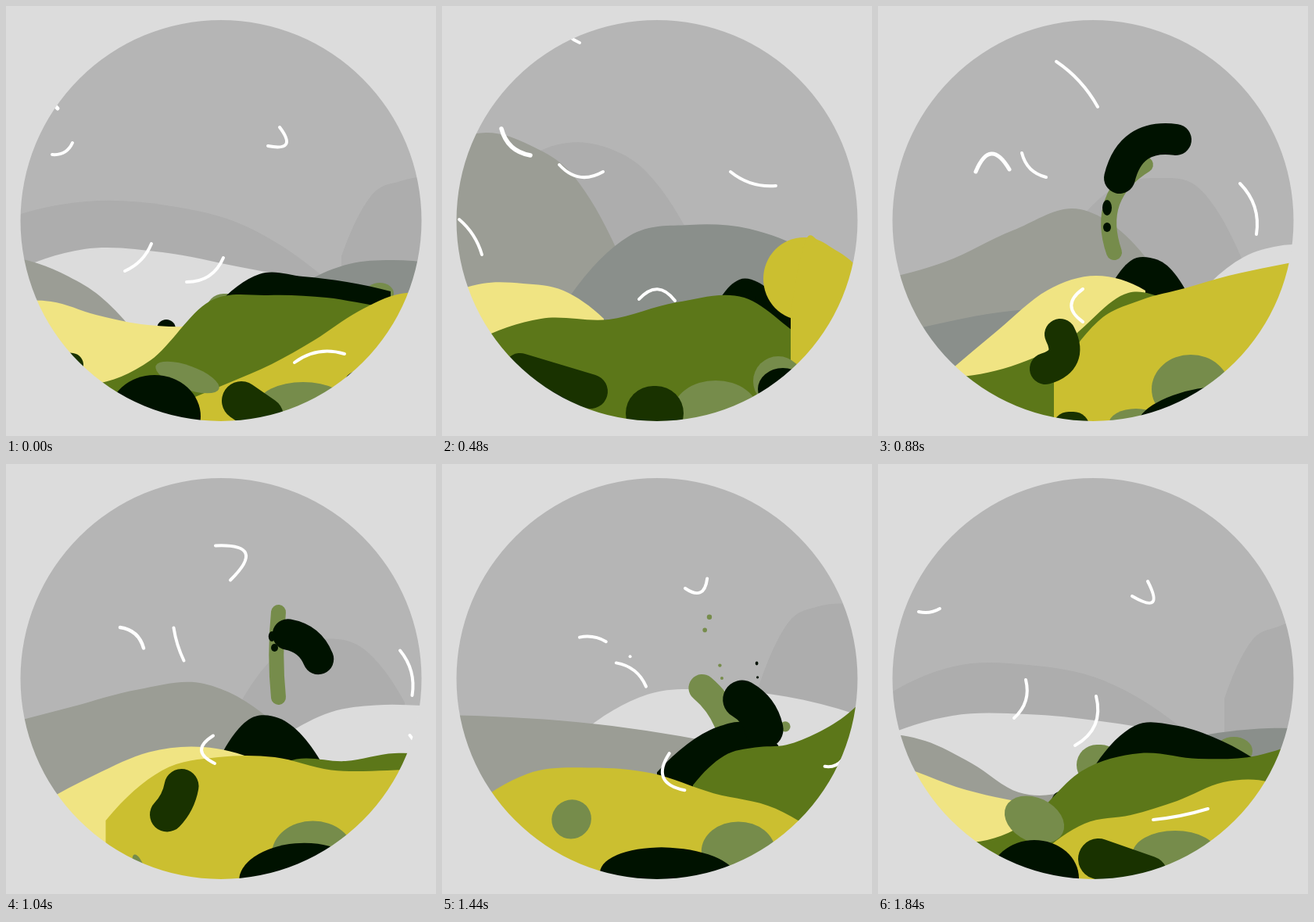
Recreate the animation shown at these times as an HTML page with a canvas. Size 550 by 550 pixels, loop 1920 ms.

```html
<!DOCTYPE html>
<html lang="en">
<head>
<meta charset="utf-8">
<title>Rolling hills</title>
<style>
html, body { margin: 0; width: 100%; height: 100%; overflow: hidden; background: #dcdcdc }
canvas { display: block }
</style>
</head>
<body>
<canvas id="stage" width="550" height="550"></canvas>
<script>
const ctx = document.getElementById('stage').getContext('2d');
const STEP = 80, STEPS = 24;
const TIMES = [0, 2, 6, 11, 15, 20, 23, 24]; // steps at which poses are reached
const POSES = TIMES.length - 1;
const sky = '#b5b5b5', haze = '#adadad', mist = '#dcdcdc', warm = '#9b9d95', slate = '#8a8f8b',
  pale = '#f0e483', black = '#001200', green = '#5c7719', gold = '#cbbf30', moss = '#768c4b',
  dark = '#193200', white = '#fff';

// A part with exactly POSES poses is cyclic; a longer chain lives on into the next loops.
const parts = [];
const add = draw => (color, ...poses) => parts.push({ draw, color, poses });
const hill = add(drawHill), oval = add(drawOval), arc = add(drawArc);
const skip = n => Array(n).fill(null);
const flat = (left, right, y) => [left, right, ...Array(5).fill(y)];

// Skyline through heights spaced evenly from left to right
function drawHill([left, right, ...h], color) {
  const last = h.length - 1, dx = (right - left) / last;
  const slope = i =>
    i === 0 ? (4 * h[1] - 3 * h[0] - h[2]) / 2 :
    i === last ? (3 * h[i] - 4 * h[i - 1] + h[i - 2]) / 2 :
    (h[i + 1] - h[i - 1]) / 2;
  ctx.beginPath();
  ctx.moveTo(left, 600);
  ctx.lineTo(left, h[0]);
  for (let i = 0, x = left; i < last; i++, x += dx) {
    ctx.bezierCurveTo(x + dx / 3, h[i] + slope(i) / 3,
      x + dx * 2 / 3, h[i + 1] - slope(i + 1) / 3, x + dx, h[i + 1]);
  }
  ctx.lineTo(right, 600);
  ctx.fillStyle = color;
  ctx.fill();
}
function drawOval([x, y, rx, ry, tilt = 0], color) {
  ctx.beginPath();
  ctx.ellipse(x, y, rx, ry, tilt * Math.PI / 180, 0, 2 * Math.PI);
  ctx.fillStyle = color;
  ctx.fill();
}
// Round-ended curve, bent sideways by a share of its length
function drawArc([x1, y1, x2, y2, bend, width = 4], color) {
  ctx.beginPath();
  ctx.moveTo(x1, y1);
  ctx.quadraticCurveTo((x1 + x2) / 2 - bend * (y2 - y1), (y1 + y2) / 2 + bend * (x2 - x1), x2, y2);
  ctx.strokeStyle = color;
  ctx.lineWidth = width;
  ctx.stroke();
}

// Distance
hill(haze, ...skip(4),
  flat(0, 300, 400),
  [0, 300, 345, 311, 303, 310, 340],
  [0, 385, 303, 259, 257, 277, 335],
  [0, 410, 272, 250, 255, 282, 350],
  [0, 400, 245, 231, 246, 281, 340],
  [100, 315, 200, 176, 180, 212, 290],
  [245, 470, 290, 233, 220, 236, 335],
  [355, 550, 320, 244, 227, 237, 275],
  [437, 560, 265, 177, 153, 140, 130],
  [443, 580, 300, 227, 208, 198, 190],
  [429, 580, 320, 243, 224, 217, 215],
  [380, 570, 310, 285, 283, 292, 300],
  flat(430, 570, 340));
hill(mist,
  [0, 400, 345, 311, 315, 334, 353],
  [80, 300, 345, 337, 337, 347, 372],
  flat(380, 600, 430),
  [424, 600, 355, 321, 307, 305, 308],
  [290, 580, 340, 314, 310, 313, 320],
  [97, 495, 352, 282, 275, 287, 320],
  [0, 380, 352, 322, 320, 329, 345]);
hill(warm,
  [0, 160, 320, 329, 346, 371, 412],
  [0, 178, 248, 256, 278, 320, 400],
  [0, 225, 180, 162, 178, 218, 315],
  [0, 345, 350, 327, 287, 260, 325],
  [0, 330, 315, 294, 290, 302, 328],
  [0, 360, 325, 344, 357, 367, 375],
  [0, 240, 345, 354, 383, 420, 418]);
hill(slate,
  [385, 600, 352, 330, 325, 329, 340],
  [305, 560, 357, 306, 301, 309, 330],
  [163, 470, 372, 294, 280, 285, 315],
  [0, 280, 425, 408, 394, 386, 380],
  flat(100, 380, 450),
  flat(300, 500, 430),
  [400, 600, 350, 342, 338, 339, 345]);

// Bushes and what they throw up
arc(moss,
  [278, 390, 285, 390, 0, 44], null,
  [385, 380, 390, 380, 0, 20],
  [342, 203, 302, 315, .4, 20],
  [355, 176, 395, 282, -.3, 18],
  [318, 360, 345, 362, 0, 46],
  [280, 385, 285, 385, 0, 52]);
oval(moss, [478, 368, 18, 14], [480, 370, 0, 0], ...skip(2),
  [430, 340, 0, 0], [445, 333, 11, 11], [455, 367, 24, 18]);
hill(black,
  [268, 492, 385, 343, 346, 353, 365],
  [247, 500, 380, 347, 347, 350, 343],
  [357, 450, 372, 350, 353, 371, 400],
  [298, 398, 358, 326, 322, 335, 372],
  [257, 408, 378, 330, 323, 345, 390],
  [287, 445, 405, 377, 345, 322, 340],
  [278, 478, 385, 335, 334, 349, 375]);
arc(black, ...skip(2),
  [385, 372, 392, 374, 0, 20],
  [309, 220, 381, 171, -.45, 40],
  [412, 216, 418, 328, -.1, 39],
  [365, 358, 408, 347, -.3, 56],
  null);
oval(black, [205, 413, 12, 12], [197, 390, 12, 12], [250, 420, 4, 4], [293, 258, 6, 10],
  [387, 183, 2.5, 3], [413, 303, 1.5, 2], [233, 433, 11, 14]);
oval(black, ...skip(2), [360, 380, 0, 0], [293, 283, 5, 6], [394, 187, 4, 4], [410, 330, 0, 0], null);
for (const [x1, y1, x2, y2, r, color = moss] of [
  [302, 210, 359, 214, 4], [290, 239, 399, 270, 2.5], [298, 217, 398, 312, 2],
  [330, 182, 350, 205, 5], [240, 275, 241, 227, 2, white]
]) oval(color, ...skip(4), [x1, y1, r, r], [x2, y2, 2, 2], null);

// Fields
hill(pale,
  [0, 230, 380, 378, 395, 407, 410],
  [0, 180, 390, 369, 357, 368, 402],
  [0, 207, 372, 355, 355, 364, 400],
  [90, 342, 468, 415, 364, 345, 364],
  [0, 300, 400, 380, 373, 379, 394],
  flat(0, 290, 450),
  [0, 200, 378, 394, 413, 426, 435]);
oval(green, ...skip(4), [55, 440, 0, 0], [78, 423, 32, 12], [100, 480, 0, 0]);
hill(green,
  [110, 560, 484, 453, 378, 370, 373, 385, 390],
  [60, 560, 470, 443, 379, 378, 391, 408, 415],
  [40, 560, 430, 400, 401, 379, 373, 430, 440],
  [80, 560, 475, 464, 429, 367, 385, 385, 385],
  [285, 560, 397, 375, 377, 388, 375, 355, 365],
  [345, 560, 420, 372, 353, 340, 323, 294, 220],
  [110, 560, 484, 462, 393, 370, 377, 373, 345]);
oval(gold, null, [512, 385, 40, 45], [463, 349, 52, 53], [440, 420, 45, 50], ...skip(3));
hill(gold,
  [230, 560, 505, 482, 458, 427, 391, 368, 372],
  [370, 560, 495, 469, 436, 373, 332, 331, 345],
  [446, 560, 395, 300, 302, 312, 325, 345, 360],
  [225, 560, 480, 404, 376, 361, 345, 333, 322],
  [30, 560, 432, 380, 374, 389, 438, 451, 452],
  [30, 470, 455, 407, 398, 400, 410, 434, 520],
  [205, 560, 502, 460, 449, 431, 407, 407, 440]);

// Foreground
oval(moss,
  [232, 475, 43, 15, 20], [258, 510, 60, 17, 0], null, [165, 540, 7, 20, 0],
  [177, 500, 7, 23, -37], [158, 424, 38, 26, -30], [200, 455, 40, 28, 25]);
oval(moss, null,
  [433, 478, 15, 15], [430, 480, 32, 32], [400, 490, 50, 44], [385, 508, 55, 41],
  [375, 487, 42, 36, -25], [380, 500, 55, 31], [380, 510, 58, 29],
  [350, 510, 60, 38], [350, 520, 55, 41], [330, 535, 35, 20]);
arc(dark,
  [76, 458, 84, 459, 0, 30],
  [85, 465, 108, 457, 0, 44],
  [100, 466, 190, 493, 0, 44],
  [233, 420, 214, 464, -.6, 40],
  [216, 404, 198, 433, .3, 48],
  ...skip(2));
arc(dark,
  [301, 505, 330, 525, 0, 50],
  [305, 535, 322, 511, 0, 44],
  [270, 521, 274, 521, 0, 70],
  [244, 540, 250, 540, 0, 42],
  [240, 560, 250, 560, 0, 30],
  [228, 512, 316, 505, 0, 52],
  [282, 505, 345, 527, 0, 52]);
oval(black,
  [450, 485, 18, 18], [444, 482, 20, 20], [436, 490, 32, 27], [415, 525, 85, 36, -10],
  [332, 530, 66, 49, 0], [262, 525, 103, 28, 5], [200, 530, 57, 49, 0],
  [190, 525, 59, 53, 0], [160, 520, 75, 57, 0], [120, 525, 90, 38, 25], [120, 590, 60, 30, 0]);

// Wind
arc(white,
  [55, 120, 66, 131, 0, 5], [62, 122, 78, 144, -.2, 5], [76, 157, 113, 191, .32, 5.5],
  [125, 212, 168, 209, -1, 5], [167, 206, 184, 262, .35, 4], [182, 232, 227, 204, -.55, 4],
  [174, 325, 189, 276, .3, 4], [152, 339, 186, 304, .2, 4], [84, 342, 158, 334, .2, 4],
  [22, 273, 51, 318, -.15, 4], [-40, 300, -10, 345, 0, 4]);
arc(white, ...skip(4),
  [-10, 150, 0, 165, 0], [30, 165, 41, 181, 0], [52, 189, 79, 185, .2],
  [59, 190, 85, 175, .35], [83, 175, 130, 172, -.3], [150, 203, 206, 212, .4],
  [184, 188, 215, 219, .3], [245, 231, 240, 284, -.15], [208, 270, 275, 285, -.35],
  [252, 360, 279, 297, .38], [231, 353, 278, 322, .33], [256, 345, 241, 370, 1.4],
  [252, 375, 298, 377, -.6], [262, 362, 262, 404, .7], [268, 333, 272, 362, 1.1],
  [306, 395, 336, 454, .5], [352, 455, 422, 441, .05], [369, 456, 433, 445, -.25],
  [420, 447, 440, 468, -.3], [510, 450, 530, 470, -.3]);
arc(white, null,
  [130, 5, 153, 28, 0], [150, 25, 176, 47, .15], [228, 71, 281, 129, -.12],
  [308, 138, 293, 168, -2.5], [360, 152, 323, 153, .3], [345, 150, 325, 169, -1.7],
  [350, 155, 335, 179, -1.3], [354, 164, 352, 199, -.3], [369, 212, 427, 230, .2],
  [463, 227, 484, 292, -.25], [545, 250, 555, 300, -.2]);
arc(white, ...skip(3),
  [550, 330, 575, 340, .3], [483, 364, 515, 372, .55], [494, 402, 510, 383, .1], [545, 400, 560, 385, 0]);

function blend(from, to, u) {
  if (!u) return from;
  return from && to && from.map((v, i) => v + ((to[i] ?? 0) - v) * u);
}

function frame(now) {
  const step = Math.floor(now / STEP) % STEPS;
  const span = TIMES.findLastIndex(t => t <= step);
  const u = (step - TIMES[span]) / (TIMES[span + 1] - TIMES[span]);
  ctx.fillStyle = sky;
  ctx.fillRect(0, 0, 550, 550);
  ctx.lineCap = 'round';
  for (const { draw, color, poses } of parts) {
    for (let i = span; i < poses.length; i += POSES) {
      const next = poses.length === POSES ? (i + 1) % POSES : i + 1;
      const pose = blend(poses[i], poses[next], u);
      if (pose) draw(pose, color);
    }
  }
  // Round window
  ctx.beginPath();
  ctx.rect(0, 0, 550, 550);
  ctx.arc(275, 274.5, 256.5, 0, 2 * Math.PI);
  ctx.fillStyle = mist;
  ctx.fill('evenodd');
  requestAnimationFrame(frame);
}
requestAnimationFrame(frame);
</script>
</body>
</html>
```
